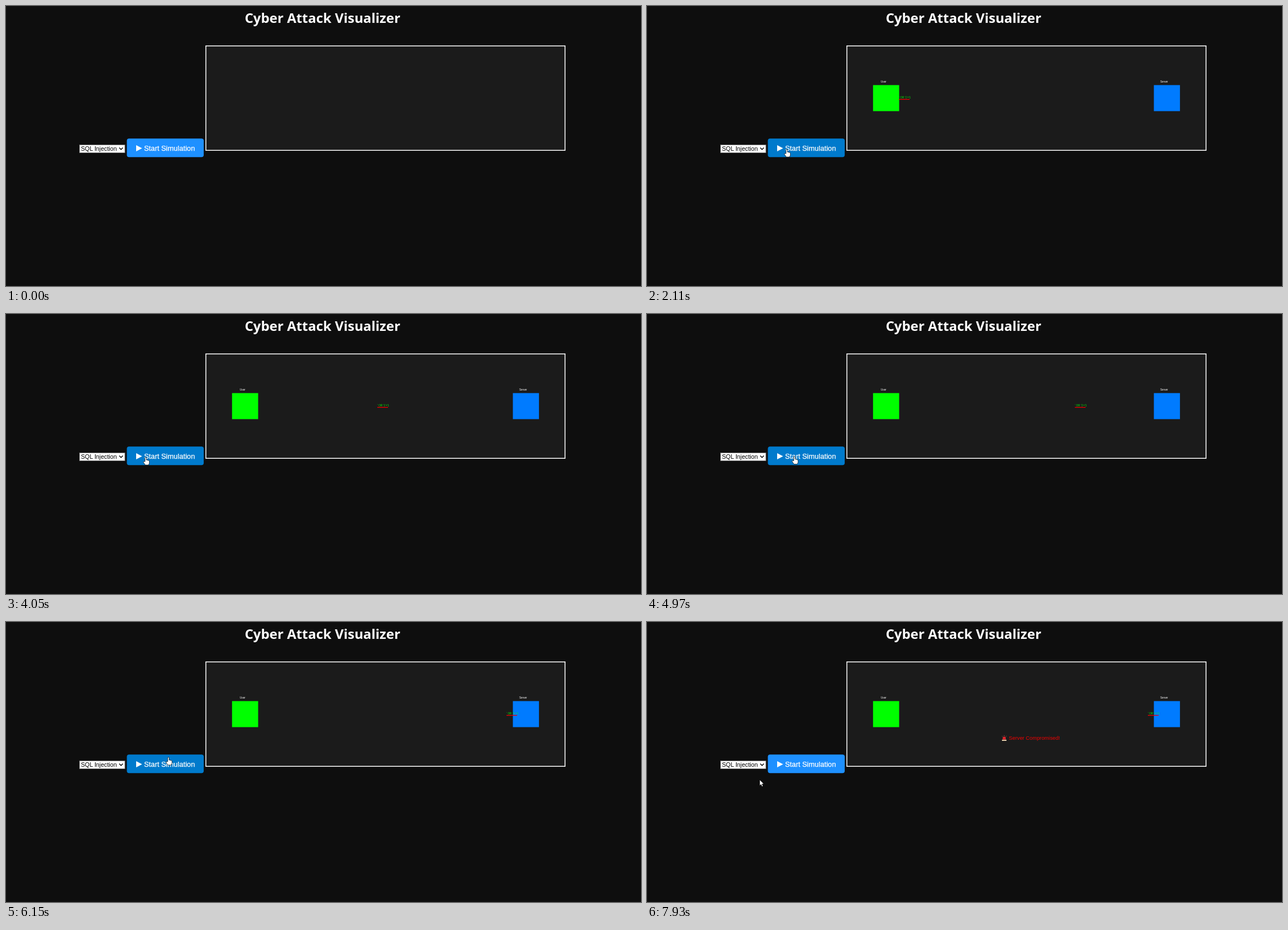
An HTML page for the animation above (8 s loop, 1127 by 497 pixels).

```html
<!DOCTYPE html>
<html lang="en">
<head>
<meta charset="utf-8">
<title>Cyber Attack Visualizer</title>
<style>
html, body { margin: 0; width: 100%; height: 100%; overflow: hidden; background: #0e0e0e; }
svg { display: block; width: 1127px; height: 497px; }
text { font-family: "Liberation Sans", Arial, sans-serif; fill: #fff; white-space: pre; }
.title { font: bold 23.9px "Open Sans", "Noto Sans", sans-serif; }
.label { font-size: 12.8px; stroke: #fff; stroke-width: .25px; }
.tiny { font-size: 4.65px; }
</style>
</head>
<body>
<svg viewBox="0 0 1127 497">
  <text class="title" x="561.7" y="30" text-anchor="middle">Cyber Attack Visualizer</text>

  <rect x="130.5" y="246.5" width="80.5" height="14" fill="#fff" stroke="#767676"/>
  <text x="133" y="257" font-size="10.67" style="fill:#000">SQL Injection</text>
  <path d="M201 251.6l3.2 3.2 3.2-3.2" fill="none" stroke="#000" stroke-width="1.4"/>

  <rect id="button" x="214.5" y="235.2" width="136.4" height="33" rx="4"/>
  <path d="M231 247v11l10.6-5.5z" fill="#fff"/>
  <text class="label" x="245" y="257">Start Simulation</text>

  <rect x="354.7" y="70.8" width="637.5" height="185.4" fill="#1b1b1b" stroke="#fff" stroke-width="1.5"/>
  <g id="scene">
    <rect x="401.2" y="140.4" width="46.3" height="46.2" fill="#0f0"/>
    <rect x="899.6" y="140.4" width="46.3" height="46.2" fill="#007bff"/>
    <text class="tiny" x="415" y="136">User</text>
    <text class="tiny" x="911" y="136">Server</text>
    <g id="packet">
      <rect y="165" width="19" height="1.3" fill="#e00"/>
      <text class="tiny" y="163.6" style="fill:#0f0">' OR '1'='1</text>
    </g>
    <g id="alert">
      <path d="M630 209h8v2h-8z" fill="#e8c9a8"/>
      <path d="M631.2 208.6v-2.2a2.8 2.8 0 0 1 5.6 0v2.2z" fill="#e0252c"/>
      <path d="M634 202.4v-1.4M631.2 203.4l-1-1M636.8 203.4l1-1" stroke="#d9756a" stroke-width=".8"/>
      <text x="642.3" y="209.3" font-size="9.3" style="fill:#f00000">Server Compromised!</text>
    </g>
  </g>

  <g id="cursor" stroke="#000" stroke-width=".7" fill="#fff" stroke-linejoin="round">
    <path id="arrow" d="M0 0v10.6l2.4-2.2 1.7 3.8 1.9-.9-1.7-3.7h3.3z"/>
    <path id="hand" d="M-1.2 8V1.2a1.2 1.2 0 0 1 2.4 0V5l4 .9q1.2.4 1.2 1.8v3.2L5 14H-.8L-4 9.4q-.6-1.6 1-1.7z"/>
  </g>
</svg>
<script>
const LOOP = 8000, ENTER = 520, START = 2080;
const SPEED = 0.1092, FROM = 447, TO = 889; // packet: px per ms, left edge at both ends

const el = id => document.getElementById(id);
const show = (id, on) => el(id).setAttribute("visibility", on ? "inherit" : "hidden");
const move = (id, x, y) => el(id).setAttribute("transform", `translate(${x} ${y})`);
const linear = f => f;
const easeOut = f => 1 - (1 - f) ** 3;

// The mouse travels from one resting point to the next
const home = { x: 1015, y: 459 };
const moves = [
  { start: ENTER, end: 1430, x: 299, y: 269, ease: easeOut },     // in from the corner
  { start: 1430, end: 1760, x: 248, y: 254, ease: easeOut },      // onto the button
  { start: 4690, end: 5450, x: 285, y: 250, ease: linear },
  { start: 5480, end: 5660, x: 649.5, y: 153, ease: linear },     // over the canvas
  { start: 5660, end: 6200, x: 288, y: 240, ease: easeOut },      // back to the button
  { start: 6700, end: 6890, x: 287, y: 292, ease: linear },
  { start: 6890, end: 7240, x: 318, y: 478, ease: linear },
  { start: 7340, end: 7930, x: 200, y: 280, ease: easeOut }
];

function mouseAt(t) {
  let { x, y } = home;
  for (const m of moves) {
    const f = m.ease(Math.min(1, Math.max(0, (t - m.start) / (m.end - m.start))));
    x += (m.x - x) * f;
    y += (m.y - y) * f;
  }
  return { x, y };
}

function draw(t) {
  const { x, y } = mouseAt(t);
  const hover = x > 214 && x < 351 && y >= 235 && y < 268;
  el("button").setAttribute("fill", hover ? "#007acc" : "#1e90ff");
  move("cursor", x, y);
  show("cursor", t >= ENTER);
  show("hand", hover);
  show("arrow", !hover);

  const left = Math.min(TO, FROM + SPEED * Math.max(0, t - START - 30));
  move("packet", left, 0);
  show("scene", t >= START);
  show("alert", left === TO);
}

const begin = performance.now();
function tick() {
  draw((performance.now() - begin) % LOOP);
  requestAnimationFrame(tick);
}
tick();
</script>
</body>
</html>
```
